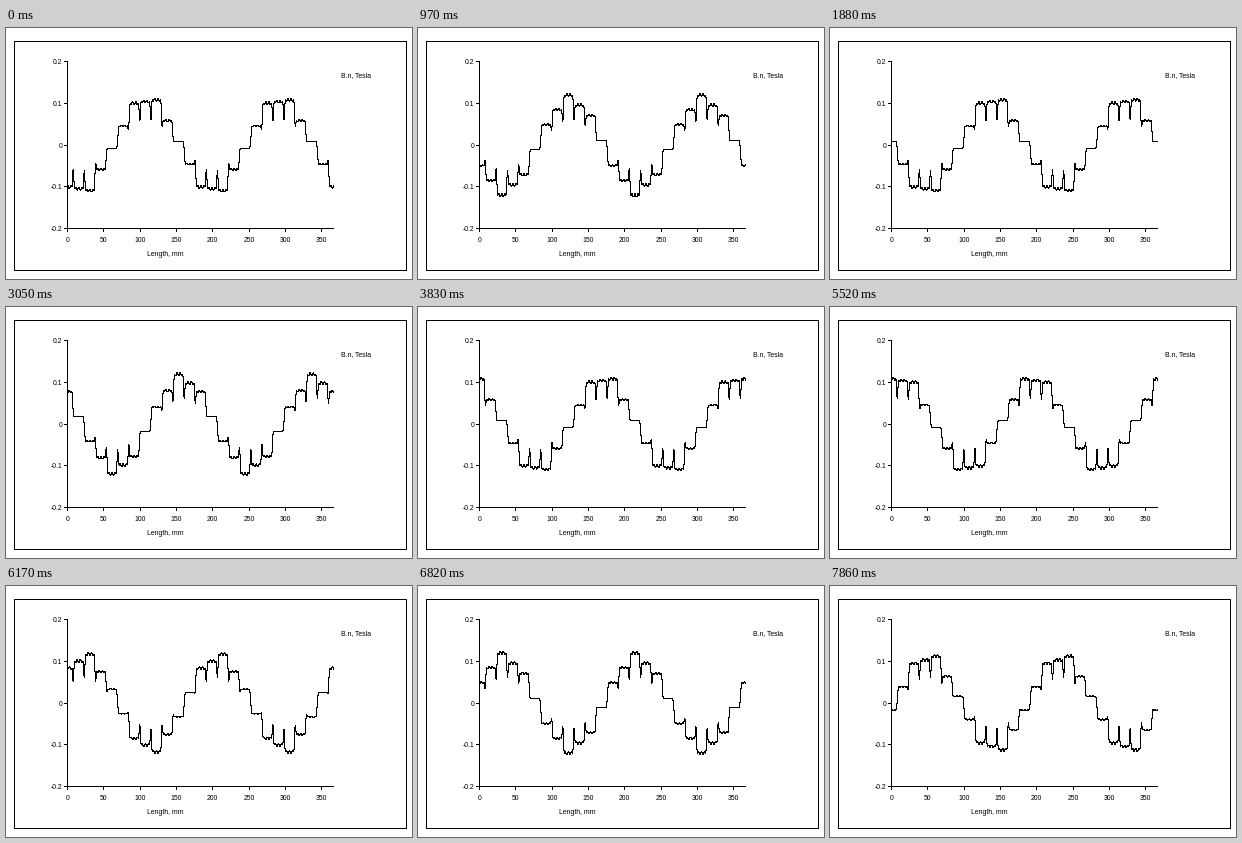
Write a matplotlib script that moves like this. It is 406 px wide and 251 px high and loops after 7.99 s.

```python
import numpy as np
import matplotlib.pyplot as plt
from matplotlib.animation import FuncAnimation
from matplotlib.collections import LineCollection

W, H, DPI = 406, 251, 128
LOOP, INTERVAL = 7990, 17          # ms
FIRST_HOLD, HOLD = 60, 130         # ms per pose
PX = 72 / DPI                      # one pixel in points

X0, Y0 = 61, 116.6                 # origin of the plot, in pixel indices
SX, SY = 0.7262, 417.5             # pixels per mm, pixels per tesla
LENGTH, SLOTS = 366.6, 24
PITCH = LENGTH / SLOTS
FIRST_SLOT = 7.9
STEP = 0.0605                      # field jump at full phase current
START_DEG, DEG_PER_POSE = 34, 4

plt.rcParams["font.family"] = "Liberation Sans"
fig = plt.figure(figsize=(W / DPI, H / DPI), dpi=DPI, facecolor="white")
ax = fig.add_axes([0, 0, 1, 1])
ax.set_xlim(0, W)
ax.set_ylim(H, 0)
ax.axis("off")


def stroke(xs, ys):
    ax.plot(xs, ys, color="black", lw=PX, snap=True)


def label(x, y, text, ha="center"):
    ax.text(x, y, text, fontsize=6.9 * PX, ha=ha, va="center_baseline")


def draw_axes():
    stroke([8, 400, 400, 8, 8], [13, 13, 242, 242, 13])
    bottom = 200
    stroke([X0, X0], [33, bottom])
    stroke([X0, X0 + LENGTH * SX], [bottom, bottom])
    for value in (0.2, 0.1, 0, -0.1, -0.2):
        y = Y0 - value * SY
        stroke([X0 - 3, X0], [y, y])
        label(56.5, y + 0.5, f"{value:g}", "right")
    for mm in range(0, 351, 50):
        x = X0 + mm * SX
        stroke([x, x], [bottom, bottom + 3])
        label(x + 0.3, 212, str(mm))
    label(159.3, 225, "Length, mm")
    label(335, 47, "B.n, Tesla", "left")


# Several samples per pixel column; each column becomes one crisp bar.
columns = np.arange(X0, X0 + int(LENGTH * SX) + 1)
mm = (columns[:, None] - X0 + np.linspace(-0.5, 0.5, 9)) / SX
slot_pos = FIRST_SLOT + PITCH * np.arange(SLOTS)
belt = np.arange(SLOTS) // 2 - 1   # two neighbouring slots share a phase
rise = 0.5 + 0.5 * np.tanh((mm[..., None] - slot_pos) / 0.7)

# Field weakens at each slot opening and ripples under each tooth.
tooth = ((mm - FIRST_SLOT) / PITCH) % 1
gap = np.minimum(tooth, 1 - tooth) * PITCH
opening = np.exp(-0.5 * (gap / 0.8) ** 2)
ripple = 0.032 * np.cos(2 * np.pi * 3 * (tooth - 0.08) / 0.84)
shape = 1 - 0.43 * opening + ripple * (1 - opening)


def field(pose):
    phase = np.radians(START_DEG + DEG_PER_POSE * pose)
    jumps = STEP * np.cos(phase - np.pi / 3 * belt)
    return (rise @ jumps - 2 * STEP * np.cos(phase)) * shape


def bars(pose):
    rows = np.round(Y0 - field(pose) * SY)
    x = columns + 0.5
    top = np.column_stack([x, rows.min(axis=1)])
    bottom = np.column_stack([x, rows.max(axis=1) + 1])
    return np.stack([top, bottom], axis=1)


draw_axes()
curve = LineCollection(bars(0), colors="black", linewidths=PX,
                       capstyle="butt", snap=False)
ax.add_collection(curve, autolim=False)


def update(i):
    t = i * INTERVAL + INTERVAL - 1
    pose = 0 if t < FIRST_HOLD else 1 + (t - FIRST_HOLD) // HOLD
    curve.set_segments(bars(pose))
    return (curve,)


anim = FuncAnimation(fig, update, frames=LOOP // INTERVAL, interval=INTERVAL,
                     repeat=True, repeat_delay=0)
plt.show()
```
